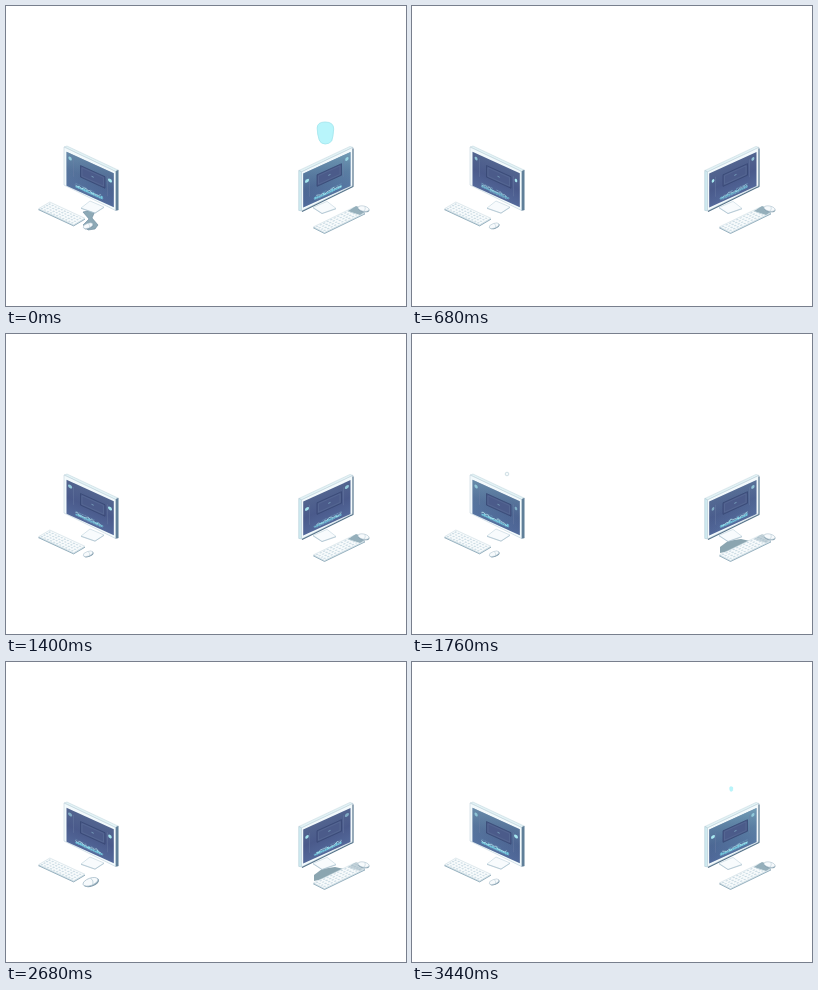
Animation, 400 px wide and 300 px high, one loop 3480 ms. Source, as an HTML page:

```html
<!DOCTYPE html>
<html lang="en">
<head>
<meta charset="utf-8">
<title>Two workstations</title>
<style>
html, body { margin: 0; width: 100%; height: 100%; overflow: hidden; background: #fff; }
svg { display: block; width: 100vw; height: 100vh; }
</style>
</head>
<body>
<svg viewBox="0 0 400 300">
  <defs>
    <linearGradient id="screen" x1="0" y1="0" x2="0" y2="1">
      <stop offset="0" stop-color="#52648f"/>
      <stop offset=".5" stop-color="#4a5a8b"/>
      <stop offset="1" stop-color="#53689a"/>
    </linearGradient>
    <linearGradient id="glow" x1="0" y1="0" x2=".8" y2="1">
      <stop offset="0" stop-color="#82bccb" stop-opacity=".75"/>
      <stop offset="1" stop-color="#477fa4" stop-opacity=".2"/>
    </linearGradient>
    <linearGradient id="desk" x1="1" y1="0" x2="0" y2="1">
      <stop offset="0" stop-color="#dcf8fa"/>
      <stop offset="1" stop-color="#b4eff5"/>
    </linearGradient>
  </defs>
  <g id="scene"></g>
</svg>
<script>
const LOOP = 3480, STEP = 40;
const scene = document.getElementById('scene');

function add(parent, tag, attrs) {
  const el = document.createElementNS('http://www.w3.org/2000/svg', tag);
  for (const k in attrs) el.setAttribute(k, attrs[k]);
  parent.appendChild(el);
  return el;
}
const path = (parent, d, fill, stroke = 'none', width = .6) =>
  add(parent, 'path', { d, fill, stroke, 'stroke-width': width, 'stroke-linejoin': 'round' });
const show = (el, v) => el.setAttribute('opacity', v.toFixed(3));
const clamp = v => Math.max(0, Math.min(1, v));

// Rises over [a,b], falls over [c,d]; wraps around the loop.
function pulse(t, a, b, c, d) {
  if (t < a) t += LOOP;
  const rise = clamp((t - a) / (b - a)), fall = clamp((d - t) / (d - c));
  return Math.min(rise, fall);
}

const desk = path(scene, 'M29 209Q27 204 33 201L62 186Q68 183 76 187L109 203Q112 206 109 210Q101 213 95 222Q88 230 70 230Q52 227 29 209Z', 'url(#desk)', '#b3dbe4');
const stem = path(scene, 'M77 206L90 203L86 212L92 219L89 223L82 224L77 219L83 213Z', '#8da9b6', '#68879a');
const shade = path(scene, 'M308 213L316 207L329 205L338 207L322 216L308 219Z', '#8ba5b0');

function monitor(right) {
  const g = add(scene, 'g', right ? { transform: 'matrix(-1 0 0 1 405 .4)' } : {});
  path(g, 'M75 202L84 195L98 201L89 207Z', '#f8fbfd', '#c0d3de', .6);
  path(g, 'M75 202.4L89 207.2L98 201.4', 'none', '#9db6c4', .6);
  path(g, 'M58 141L61 140L112 164L109.5 165.5Z', '#e2f2f5', '#b3cbd5', .4);
  path(g, 'M109.5 165.5L112.3 164V204L109.5 204.5Z', right ? '#cfeaf0' : '#607f99', right ? '#9cbccb' : '#607f99', .4);
  path(g, 'M58 141L109.5 165.5V204.5L58 179Z', '#f3fafc', '#b4c9d5', .5);
  if (right) path(g, 'M58 142V180L109 205', 'none', '#55738a', 1.1);
  const s = add(g, 'g', { transform: 'matrix(1 .455 0 1 60.5 145.7)' });
  const area = 'M0 0H47.3V34H0Z';
  path(s, area, 'url(#screen)');
  const tint = path(s, area, 'url(#glow)');
  const panel = add(s, 'g', { transform: `translate(${right ? 9 : 14} 7.5)` });
  path(panel, 'M0 0H24.5V11.5H0Z', '#4b5b8a', '#33446f', .6);
  path(panel, 'M1.5 1.5H23V10H1.5Z', 'none', '#64799f', .35);
  path(panel, 'M11 5.7H13.2', 'none', '#83b0c8', .7);
  path(s, 'M7 4V22M41 6V26', 'none', '#6d80a8', .35);
  const dots = [[3.6, 5.2], [43.5, 9]].map(([cx, cy]) =>
    add(s, 'ellipse', { cx, cy, rx: 1.7, ry: 1.7, fill: '#a8e9f1' }));
  const bars = path(s, '', '#73cbe0');
  const line = path(s, '', 'none', '#c3f1f5', .8);
  const rows = path(s, 'M9 27.5H21M24 27.5H28M11 29.7H37M17 31.8H34', 'none', '#9fe1ed', .8);
  rows.setAttribute('stroke-dasharray', '2.2 .8');
  return { tint, dots, bars, line, rows };
}
const screens = [monitor(false), monitor(true)];

// Keys sit on an isometric lattice given by an origin and two edge vectors.
function keyboard(o, u, v) {
  const at = (a, b) => (o[0] + u[0] * a + v[0] * b).toFixed(2) + ' ' + (o[1] + u[1] * a + v[1] * b).toFixed(2);
  const quad = (a, b, c, d) => `M${at(a, b)}L${at(c, b)}L${at(c, d)}L${at(a, d)}Z`;
  const body = path(scene, quad(0, 0, 1, 1), '#d3e2e9', '#86a3b3', .8);
  body.setAttribute('transform', 'translate(0 1.1)');
  path(scene, quad(0, 0, 1, 1), '#f8fbfc', '#c4d6df', .5);
  let keys = '';
  for (let i = 0; i < 11; i++)
    for (let j = 0; j < 4; j++)
      keys += quad((i + .35) / 11.5, (j + .3) / 4.4, (i + .9) / 11.5, (j + .85) / 4.4);
  path(scene, keys, '#cddde5');
}
keyboard([32.6, 202.6], [35, 16.2], [11.2, -6.6]);
keyboard([307.5, 220.8], [40.5, -19.6], [11, 5.6]);
const pad = path(scene, 'M342 205L350 200L362 204L354 209Z', '#95afbb');

function mouse(x, y, tilt) {
  const g = add(scene, 'g', {});
  add(g, 'ellipse', { cx: .4, cy: .7, rx: 5.8, ry: 2.8, fill: '#819bab' });
  add(g, 'ellipse', { rx: 5.6, ry: 2.6, fill: '#f7fafc', stroke: '#a6bdca', 'stroke-width': .5 });
  path(g, 'M1 -2.4Q2.6 0 1 2.4', 'none', '#b5cad5', .5);
  return k => g.setAttribute('transform', `translate(${x + 5 * (k - .9)} ${y}) rotate(${tilt}) scale(${k})`);
}
const leftMouse = mouse(82, 219.8, -20);
mouse(357, 202.6, 12)(1);

const drop = path(scene, 'M-8 -5Q-8 -11 0 -11Q8.5 -11 8.5 -4Q8 4 6.5 8Q4 11 0 11Q-4.5 11 -6 7Q-8 1 -8 -5Z', '#b8f5fb', '#a0e5ed', .8);
const bubble = add(scene, 'circle', { cx: 95, r: 1.8, fill: '#f5fafb', stroke: '#b5ccd6', 'stroke-width': .6 });

function drawScreen(s, t, phase, tint) {
  const w = 2 * Math.PI * t / LOOP;
  show(s.tint, tint);
  let bars = '', line = '';
  for (let i = 0; i < 13; i++) {
    const x = (9 + i * 2.1).toFixed(1);
    const wave = Math.sin(4 * w + i * 1.7 + phase) * Math.cos(3 * w - i * .8);
    const h = 1.1 + 1.7 * Math.abs(wave);
    bars += `M${x} ${(31 - h).toFixed(2)}h1.9V31.4h-1.9Z`;
    line += `${i ? 'L' : 'M'}${x} ${(29 + 1.7 * wave).toFixed(2)}`;
  }
  s.bars.setAttribute('d', bars);
  s.line.setAttribute('d', line);
  const text = pulse(t, 600, 850, 1150, 1450);
  show(s.rows, .25 + .7 * text);
  show(s.bars, .95 - .85 * text);
  show(s.line, .75 - .65 * text);
  s.dots.forEach((d, i) => {
    show(d, .75 + .25 * Math.sin(5 * w + i * 2));
    d.setAttribute('rx', (1.7 + .4 * Math.sin(3 * w + i)).toFixed(2));
  });
}

function draw(t) {
  const bright = pulse(t, 3000, 3400, 3520, 3760);
  const blue = pulse(t, 1450, 1700, 1820, 2040);
  drawScreen(screens[0], t, 0, Math.max(.6 * bright, .6 * blue));
  drawScreen(screens[1], t, .7, Math.max(.85 * bright, .2 * blue));

  show(desk, pulse(t, 1900, 2060, 2120, 2260));
  show(stem, pulse(t, 3440, 3480, 3560, 3720));
  show(shade, pulse(t, 1560, 1740, 2760, 3000));
  show(pad, 1 - .45 * pulse(t, 1500, 1740, 2720, 3000));
  leftMouse(.9 + .5 * pulse(t, 2300, 2600, 2720, 2900) + .12 * pulse(t, 120, 280, 400, 700));

  const age = t >= 3400 ? t - LOOP : t;
  const size = age <= 0 ? clamp(.22 + (age + 40) / 40 * .78) : 1 - .5 * clamp(age / 240);
  const lift = 12 * clamp(age / 200);
  drop.setAttribute('transform', `translate(319.2 ${127 - lift}) scale(${size})`);
  show(drop, pulse(t, 3400, 3440, 3520, 3700));

  bubble.setAttribute('cy', 140 - (t - 1760) / 16);
  show(bubble, pulse(t, 1680, 1740, 1780, 1880));
}

const start = performance.now();
function frame() {
  const t = (performance.now() - start) % LOOP;
  draw(Math.floor(t / STEP) * STEP);
  requestAnimationFrame(frame);
}
draw(0);
requestAnimationFrame(frame);
</script>
</body>
</html>
```
